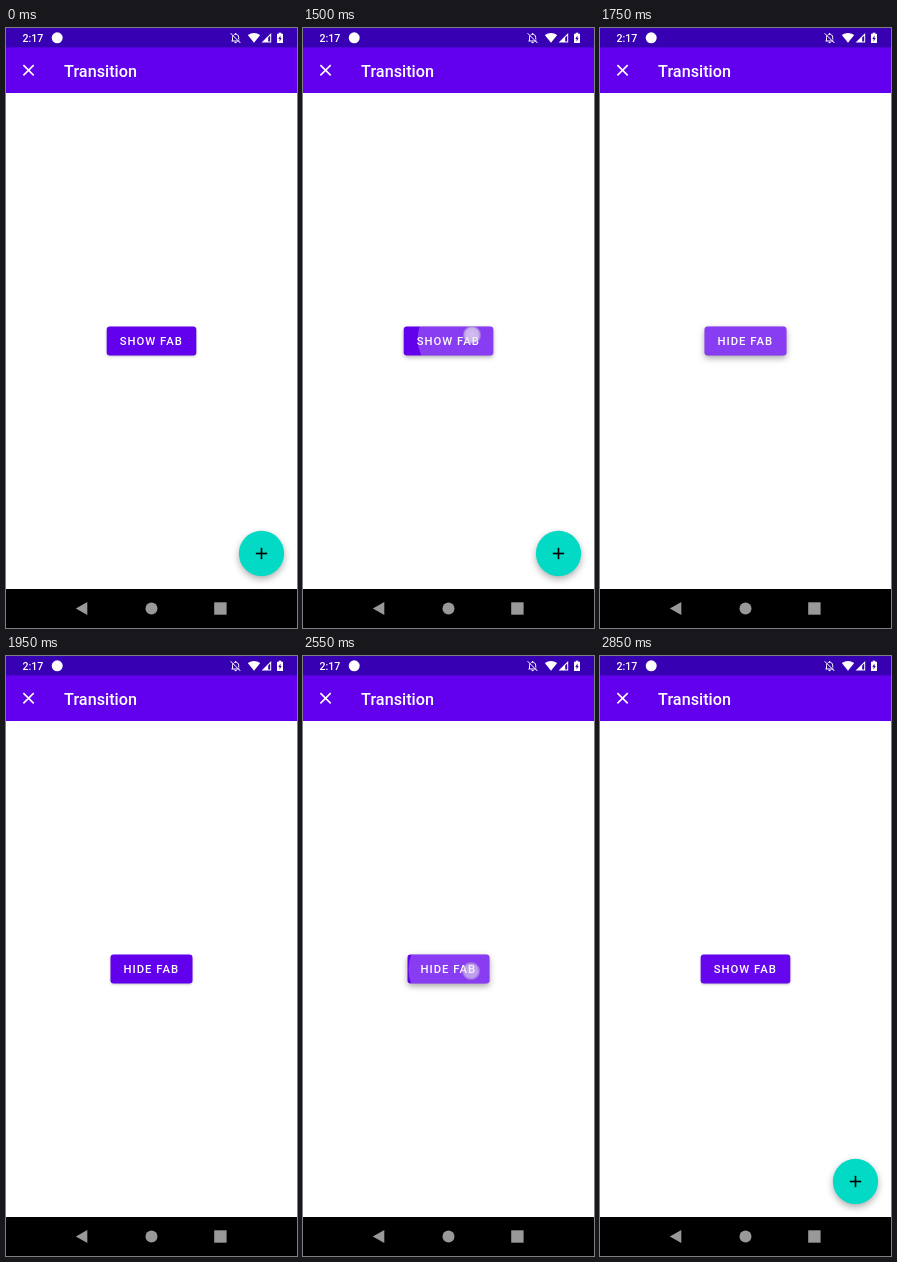
Write an HTML page with a canvas that moves like this. It is 291 px wide and 600 px high and loops after 2900 ms.

```html
<!DOCTYPE html>
<html lang="en">
<head>
<meta charset="utf-8">
<title>Transition</title>
<style>
html, body { margin: 0; width: 100%; height: 100%; overflow: hidden; background: #fff; }
canvas { display: block; width: 291px; height: 600px; }
</style>
</head>
<body>
<canvas id="stage"></canvas>
<script>
const W = 291, H = 600, LOOP = 2900, STEP = 50;
const DP = W / 360;
const PURPLE = '#6200ee', TEAL = '#03dac5';
const FONT = 'Roboto, "Open Sans", sans-serif';
const FAB = { x: 255.5, y: 525.5, r: 28 * DP };
const MID = { x: 145.5, y: 313 };
const LABELS = {
  show: { text: 'SHOW FAB', w: 89.6 },
  hide: { text: 'HIDE FAB', w: 82 }
};
// Timing of each tap, in ms
const TAPS = [
  { x: 169, y: 307, down: 1250, ripple: 1410, lift: 1580, gone: 1695, fade: 1765, drop: 1700, settle: 1950 },
  { x: 168, y: 315, down: 2250, ripple: 2410, lift: 2530, gone: 2640, fade: 2715, drop: 2620, settle: 2740 }
];
const HIDE_AT = 1600, SHOW_AT = 2650;

const dpr = Math.max(1, window.devicePixelRatio || 1);
function makeLayer(canvas) {
  canvas.width = W * dpr;
  canvas.height = H * dpr;
  const c = canvas.getContext('2d');
  c.scale(dpr, dpr);
  return c;
}
const ctx = makeLayer(document.getElementById('stage'));
const fabCtx = makeLayer(document.createElement('canvas'));

const clamp = v => Math.min(1, Math.max(0, v));
const ramp = (t, from, to) => clamp((t - from) / (to - from));
const mix = (a, b, p) => a + (b - a) * p;

function bezier(x1, y1, x2, y2) {
  const at = (a, b, s) => 3 * a * s * (1 - s) ** 2 + 3 * b * s * s * (1 - s) + s ** 3;
  return x => {
    let lo = 0, hi = 1;
    for (let i = 0; i < 24; i++) {
      const s = (lo + hi) / 2;
      if (at(x1, x2, s) < x) lo = s; else hi = s;
    }
    return at(y1, y2, lo);
  };
}
const standard = bezier(0.4, 0, 0.2, 1);
const decelerate = bezier(0, 0, 0.2, 1);

function rect(x, y, w, h, color) {
  ctx.fillStyle = color;
  ctx.fillRect(x, y, w, h);
}
function disc(c, x, y, r, color) {
  c.fillStyle = color;
  c.beginPath();
  c.arc(x, y, r, 0, Math.PI * 2);
  c.fill();
}
function poly(points, color) {
  ctx.fillStyle = color;
  ctx.beginPath();
  points.forEach(([x, y]) => ctx.lineTo(x, y));
  ctx.closePath();
  ctx.fill();
}
function line(c, x1, y1, x2, y2, width, color) {
  c.strokeStyle = color;
  c.lineWidth = width;
  c.beginPath();
  c.moveTo(x1, y1);
  c.lineTo(x2, y2);
  c.stroke();
}
function label(text, x, y, size, spacing = 0) {
  ctx.font = `500 ${size}px ${FONT}`;
  ctx.letterSpacing = spacing + 'px';
  ctx.fillStyle = '#fff';
  ctx.fillText(text, x, y);
}
function shadow(c, alpha, blur, dy) {
  c.shadowColor = `rgba(0,0,0,${alpha})`;
  c.shadowBlur = blur * dpr;
  c.shadowOffsetY = dy * dpr;
}

function drawBell(x, y) {
  ctx.strokeStyle = '#fff';
  ctx.lineWidth = 1;
  ctx.beginPath();
  ctx.moveTo(x - 3.1, y + 2.9);
  ctx.lineTo(x - 3.1, y - 0.6);
  ctx.bezierCurveTo(x - 3, y - 4.8, x + 3, y - 4.8, x + 3.1, y - 0.6);
  ctx.lineTo(x + 3.1, y + 2.9);
  ctx.stroke();
  line(ctx, x - 4.2, y + 3, x + 4.2, y + 3, 1, '#fff');
  rect(x - 0.6, y - 5, 1.2, 1.6, '#fff');
  rect(x - 1, y + 4, 2, 1.1, '#fff');
  line(ctx, x - 4.4, y - 5.4, x + 5.4, y + 4.4, 1, '#3700b3');
  line(ctx, x - 5, y - 4.8, x + 4.8, y + 5, 1, '#fff');
}

function drawStatusBar() {
  rect(0, 0, W, 19.4, '#3700b3');
  label('2:17', 16.4, 13.8, 10.6);
  disc(ctx, 51.2, 9.8, 5.5, '#fff');
  drawBell(229.6, 10);

  ctx.fillStyle = '#fff';
  ctx.beginPath();
  ctx.moveTo(248, 14.7);
  ctx.lineTo(241.8, 7.1);
  ctx.quadraticCurveTo(248, 2.9, 254.2, 7.1);
  ctx.fill();

  poly([[255.6, 14.6], [265.2, 14.6], [265.2, 5]], '#fff');
  poly([[262.2, 13.6], [264.2, 13.6], [264.2, 7.4], [262.2, 9.4]], '#3700b3');

  rect(271, 5.8, 6, 9.2, '#fff');
  rect(272.7, 4.7, 2.6, 1.4, '#fff');
  poly([[274.5, 7.4], [272.3, 11], [273.6, 11], [273.6, 13.6], [275.7, 9.9], [274.5, 9.9]], '#3700b3');
}

function drawFrame() {
  rect(0, 0, W, H, '#fff');
  rect(0, 19, W, 46, PURPLE);
  drawStatusBar();
  line(ctx, 17.4, 37.1, 27.7, 47.4, 1.6, '#fff');
  line(ctx, 27.7, 37.1, 17.4, 47.4, 1.6, '#fff');
  label('Transition', 58.1, 48.7, 16.2);

  const grey = '#999';
  rect(0, 561, W, 39, '#000');
  poly([[69.8, 580.5], [81.3, 573.9], [81.3, 587.1]], grey);
  disc(ctx, 145.5, 580.5, 6, grey);
  rect(208.2, 574.3, 12.4, 12.4, grey);
}

function buttonPath(w) {
  ctx.beginPath();
  ctx.roundRect(MID.x - w / 2, MID.y - 18 * DP, w, 36 * DP, 4 * DP);
}

function drawButton(t) {
  const { text, w } = t >= HIDE_AT && t < SHOW_AT ? LABELS.hide : LABELS.show;
  const raise = Math.max(...TAPS.map(k => ramp(t, k.ripple + 30, k.ripple + 160) * (1 - ramp(t, k.drop, k.settle))));

  ctx.save();
  shadow(ctx, mix(0.24, 0.36, raise), mix(2.5, 7, raise), mix(1, 3, raise));
  ctx.fillStyle = PURPLE;
  buttonPath(w);
  ctx.fill();
  ctx.restore();

  ctx.save();
  buttonPath(w);
  ctx.clip();
  for (const k of TAPS) {
    const alpha = 0.24 * ramp(t, k.ripple, k.ripple + 75) * (1 - ramp(t, k.fade, k.fade + 150));
    if (alpha <= 0) continue;
    const p = standard(ramp(t, k.ripple, k.ripple + 225));
    const r = mix(w * 0.3, Math.hypot(w / 2, 18 * DP) + 1, p);
    disc(ctx, mix(k.x, MID.x, p), mix(k.y, MID.y, p), r, `rgba(255,255,255,${alpha})`);
  }
  ctx.restore();
  label(text, MID.x - w / 2 + 16 * DP, 317.4, 14 * DP, 1.01);
}

function drawFab(t) {
  let alpha = 1, scale = 1;
  if (t >= HIDE_AT && t < SHOW_AT) {
    alpha = 1 - ramp(t, HIDE_AT, HIDE_AT + 75);
  } else if (t >= SHOW_AT) {
    alpha = ramp(t, SHOW_AT, SHOW_AT + 45);
    scale = mix(0.8, 1, decelerate(ramp(t, SHOW_AT, SHOW_AT + 150)));
  }
  if (alpha <= 0) return;

  const c = fabCtx;
  c.clearRect(0, 0, W, H);
  c.save();
  c.translate(FAB.x, FAB.y);
  c.scale(scale, scale);
  c.save();
  shadow(c, 0.32, 7, 3);
  disc(c, 0, 0, FAB.r, TEAL);
  c.restore();
  const arm = 7 * DP;
  line(c, -arm, 0, arm, 0, 2 * DP, '#000');
  line(c, 0, -arm, 0, arm, 2 * DP, '#000');
  c.restore();

  ctx.save();
  ctx.globalAlpha = alpha;
  ctx.drawImage(c.canvas, 0, 0, W, H);
  ctx.restore();
}

function drawTouch(t) {
  for (const k of TAPS) {
    if (t < k.down || t >= k.gone) continue;
    ctx.save();
    ctx.globalAlpha = 1 - ramp(t, k.lift, k.gone);
    const glow = ctx.createRadialGradient(k.x, k.y, 0, k.x, k.y, 9.5);
    glow.addColorStop(0, 'rgba(238,236,242,0.74)');
    glow.addColorStop(0.72, 'rgba(228,225,234,0.7)');
    glow.addColorStop(0.86, 'rgba(205,200,215,0.5)');
    glow.addColorStop(1, 'rgba(190,185,200,0)');
    disc(ctx, k.x, k.y, 9.5, glow);
    ctx.restore();
  }
}

function draw(now) {
  const t = Math.floor((now % LOOP) / STEP) * STEP;
  drawFrame();
  drawFab(t);
  drawButton(t);
  drawTouch(t);
}

const start = performance.now();
function tick() {
  draw(performance.now() - start);
  requestAnimationFrame(tick);
}
tick();
</script>
</body>
</html>
```
